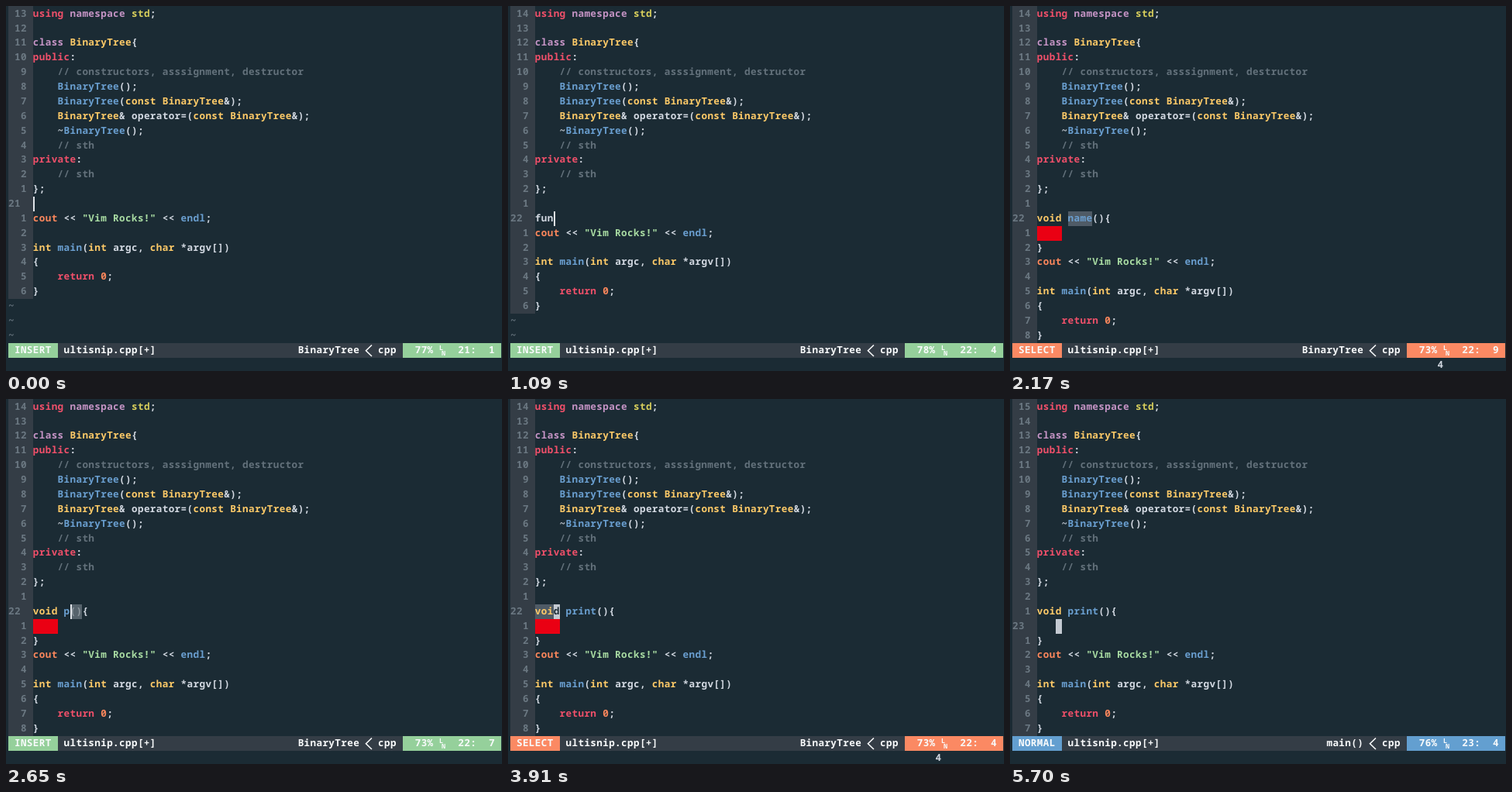
Animation of 640 by 471 pixels, one loop 5750 ms. Source, as an HTML page:

```html
<!DOCTYPE html>
<html lang="en">
<head>
<meta charset="utf-8">
<title>Snippet expansion in an editor</title>
<style>
html, body { margin: 0; width: 100%; height: 100%; overflow: hidden; background: #1b2b34; }
#stage {
  position: relative; width: 640px; height: 471px; overflow: hidden;
  background: #1b2b34;
  font: 600 12.6px/18.87px "Noto Sans Mono", "DejaVu Sans Mono", monospace;
  letter-spacing: .39px; font-variant-ligatures: none;
  text-rendering: geometricPrecision;
}
#stage span, #stage i, #stage svg { position: absolute; white-space: pre; }
#stage .ln { font-size: 8.5px; letter-spacing: 0; line-height: 9px; }
</style>
</head>
<body>
<div id="stage"></div>
<script>
const LOOP = 5750, X0 = 3, Y0 = .7, CW = 7.95, RH = 18.87, TOP_LINE = 8, ROWS = 23;
const stage = document.getElementById('stage');

const INK = {
  f: '#d3d9e2', r: '#f0506a', p: '#c594c5', y: '#fdca68', b: '#6a9fd0', c: '#63717b',
  o: '#fb875c', g: '#a8dba2', s: '#d8cf5c', k: '#1b2b34', m: '#8d979e', n: '#6b7882', w: '#f8fafb'
};
const GUTTER = '#343d46';
const BAR = { INSERT: '#95d09b', SELECT: '#fb8963', NORMAL: '#639fd0' };

// "§x" switches to ink x
const HEAD = [
  '§rusing §pnamespace §sstd§f;',
  '',
  '§pclass §yBinaryTree§f{',
  '§rpublic§f:',
  '    §c// constructors, asssignment, destructor',
  '    §bBinaryTree§f();',
  '    §bBinaryTree§f(§yconst BinaryTree§f&);',
  '    §yBinaryTree§f& operator=(§yconst BinaryTree§f&);',
  '    ~§bBinaryTree§f();',
  '    §c// sth',
  '§rprivate§f:',
  '    §c// sth',
  '};',
  ''
];
const TAIL = [
  '§ocout §f<< §g"Vim Rocks!" §f<< §bendl§f;',
  '',
  '§yint §bmain§f(§yint §fargc, §ychar §f*argv[])',
  '{',
  '    §rreturn §o0§f;',
  '}'
];

const state = (t, mode, line, col, body, extra) => ({ t, mode, line, col, body, ...extra });
const func = (name, type = '§yvoid', args = '§f()') => [`${type} §b${name}${args}§f{`, '', '}'];
const typing = (t, name) => state(t, 'INSERT', 22, 6 + name.length,
  func(name, '§yvoid', '§m()'), { trail: true, match: true });
const select = (t, col, len, body, block) =>
  state(t, 'SELECT', 22, col, body, { trail: true, len, block });

const STATES = [
  state(0, 'INSERT', 21, 1, []),
  ...['', 'f', 'fu', 'fun'].map((s, i) =>
    state([480, 720, 850, 970][i], 'INSERT', 22, s.length + 1, [s])),
  select(1460, 4, 4, func('name', '§yvoi§kd'), true),
  select(1960, 9, 4, func('name')),
  ...[1, 2, 3, 4, 5].map(n => typing(2480 + n * 120, 'print'.slice(0, n))),
  select(3740, 4, 4, func('print', '§yvoi§kd'), true),
  select(4340, 10, 5, func('print')),
  state(4700, 'INSERT', 23, 5, func('print')),
  state(5400, 'NORMAL', 23, 4, func('print'), { block: true, tag: 'main()' })
];

const px = n => n.toFixed(2) + 'px';
const colX = col => X0 + col * CW;
const rowY = row => Y0 + row * RH;

function text(row, col, str, ink) {
  return `<span style="left:${px(colX(col))};top:${px(rowY(row))};color:${INK[ink]}">` +
    str.replace(/&/g, '&amp;').replace(/</g, '&lt;') + '</span>';
}

function box(x, y, w, h, fill) {
  return `<i style="left:${px(x)};top:${px(y)};width:${px(w)};height:${px(h)};background:${fill}"></i>`;
}

const cells = (row, col, n, fill) => box(colX(col), rowY(row), n * CW, RH, fill);

function codeLine(row, line) {
  let col = 4;
  return ('§f' + line).split('§').slice(1).map(part => {
    const str = part.slice(1), out = str.trim() ? text(row, col, str, part[0]) : '';
    col += str.length;
    return out;
  }).join('');
}

function statusBar(s, total) {
  const y = rowY(23), tag = s.tag || 'BinaryTree', fill = BAR[s.mode];
  const percent = Math.floor(s.line * 100 / total) + '%';
  const small = (x, dy, ch) =>
    `<span class="ln" style="left:${x}px;top:${px(y + dy)};color:${INK.w}">${ch}</span>`;
  return cells(23, 0, 80, GUTTER) + cells(23, 0, 8, fill) + cells(23, 64, 16, fill) +
    text(23, 1, s.mode, 'w') + text(23, 9, 'ultisnip.cpp[+]', 'w') +
    text(23, 57 - tag.length, tag, 'w') +
    `<svg style="left:463px;top:${px(y)}" width="10" height="19"><path d="M9 2.5 1.5 9.8 9 17" fill="none" stroke="${INK.w}" stroke-width="1.6"/></svg>` +
    text(23, 60, 'cpp', 'w') + text(23, 66, percent, 'w') +
    small(559, 2, 'L') + small(562, 9, 'N') +
    text(23, 73, s.line + ':' + String(s.col).padStart(3), 'w');
}

function draw(s) {
  const lines = [...HEAD, ...s.body, ...TAIL];
  const shown = Math.min(lines.length, ROWS), cur = s.line - TOP_LINE;
  const total = TOP_LINE - 1 + lines.length;
  let html = box(X0, 0, colX(4) - X0, rowY(shown), GUTTER);

  if (s.trail) html += cells(15, 4, 4, '#ea0013');
  if (s.len) html += cells(cur, 4 + s.col - s.len, s.len, '#4f5b66');
  if (s.match) html += cells(cur, 3 + s.col, 2, '#56636c');
  if (s.block) html += cells(cur, 3 + s.col, 1, '#c4cad2');

  for (let row = 0; row < ROWS; row++) {
    if (row >= shown) { html += text(row, 0, '~', 'n'); continue; }
    const gap = Math.abs(row - cur);
    html += gap ? text(row, 1, String(gap).padStart(2), 'n') : text(row, 0, String(s.line), 'n');
    html += codeLine(row, lines[row]);
  }

  if (s.mode === 'INSERT') html += box(colX(3 + s.col), rowY(cur), 2, RH, '#dfe3e8');
  html += statusBar(s, total);
  if (s.len) html += text(24, 69, String(s.len), 'f');
  stage.innerHTML = html;
}

let current;
function tick() {
  const t = performance.now() % LOOP;
  const next = STATES.findLast(s => s.t <= t);
  if (next !== current) draw(current = next);
  requestAnimationFrame(tick);
}
tick();
</script>
</body>
</html>
```
